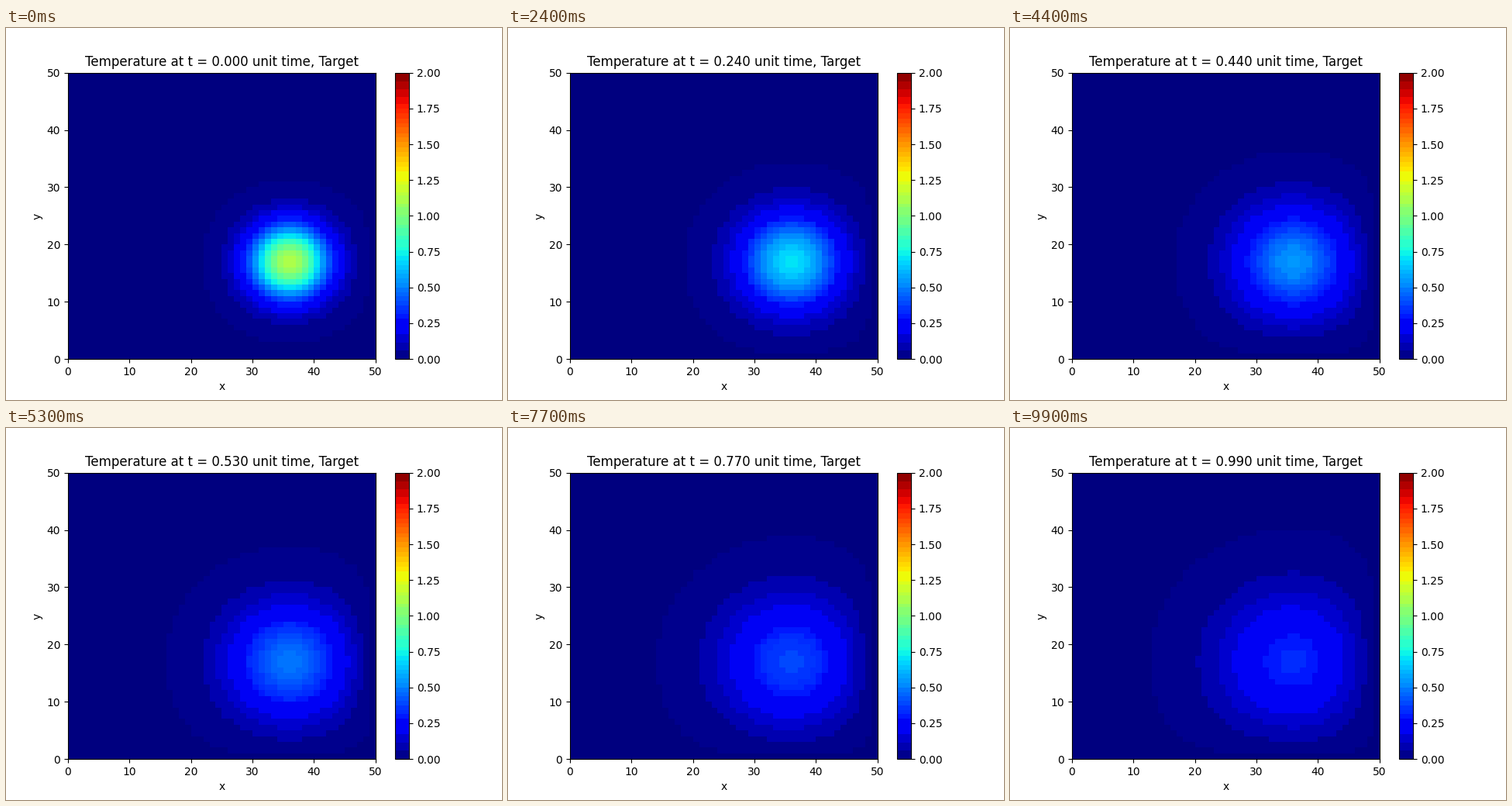
A matplotlib script that plays this animation: 640 px wide and 480 px high, repeating every 10 s.

```python
import numpy as np
import matplotlib.pyplot as plt
from matplotlib.animation import FuncAnimation
from matplotlib.colors import ListedColormap

N = 50                   # grid nodes per side
FRAMES, INTERVAL = 100, 100
DT = 0.01                # simulated time per frame
VMAX = 2.0
CX, CY = 35.5, 16.5      # centre of the hot spot, in nodes
PEAK = 1.134
SPREAD = 42.2            # squared width at t = 0, in nodes^2
RATE = 105.5             # growth of the squared width per unit time


def profile(centre, width):
    """1D Gaussian held at zero on both walls by mirror images."""
    n = np.arange(N)

    def bell(c):
        return np.exp(-(n - c) ** 2 / width)

    return bell(centre) - bell(-centre) - bell(2 * (N - 1) - centre)


def temperature(t):
    width = SPREAD + RATE * t
    field = np.outer(profile(CY, width), profile(CX, width))
    return np.clip(PEAK * SPREAD / width * field, 0, VMAX)


def banded_jet(field):
    """Jet reduced to 3-4-3 bits per channel, each band in its mean colour."""
    rgb = np.floor(plt.get_cmap("jet", 256)(np.arange(256))[:, :3] * 255)
    bands = (rgb // [32, 16, 32]).astype(int)
    idx = np.minimum(field / VMAX * 256, 255).astype(int).ravel()
    weight = 26 + 58.6 * np.bincount(idx, minlength=256)
    out = np.zeros((256, 3))
    for band in np.unique(bands, axis=0):
        sel = (bands == band).all(axis=1)
        out[sel] = np.average(rgb[sel], axis=0, weights=weight[sel])
    return ListedColormap(np.clip(out / 255, 0, 1))


def title(t):
    return f"Temperature at t = {t:.3f} unit time, Target"


start = temperature(0)
fig, ax = plt.subplots(figsize=(6.4, 4.8), dpi=100)
edges = np.arange(N + 1)
mesh = ax.pcolormesh(edges, edges, start, cmap=banded_jet(start),
                     vmin=0, vmax=VMAX)
fig.colorbar(mesh, ax=ax)
ax.set_xlabel("x")
ax.set_ylabel("y")
ax.set_title(title(0))


def update(i):
    t = i * DT
    mesh.set_array(temperature(t))
    ax.set_title(title(t))
    return [mesh]


anim = FuncAnimation(fig, update, frames=FRAMES, interval=INTERVAL,
                     repeat=True, repeat_delay=0, blit=False)
plt.show()
```
